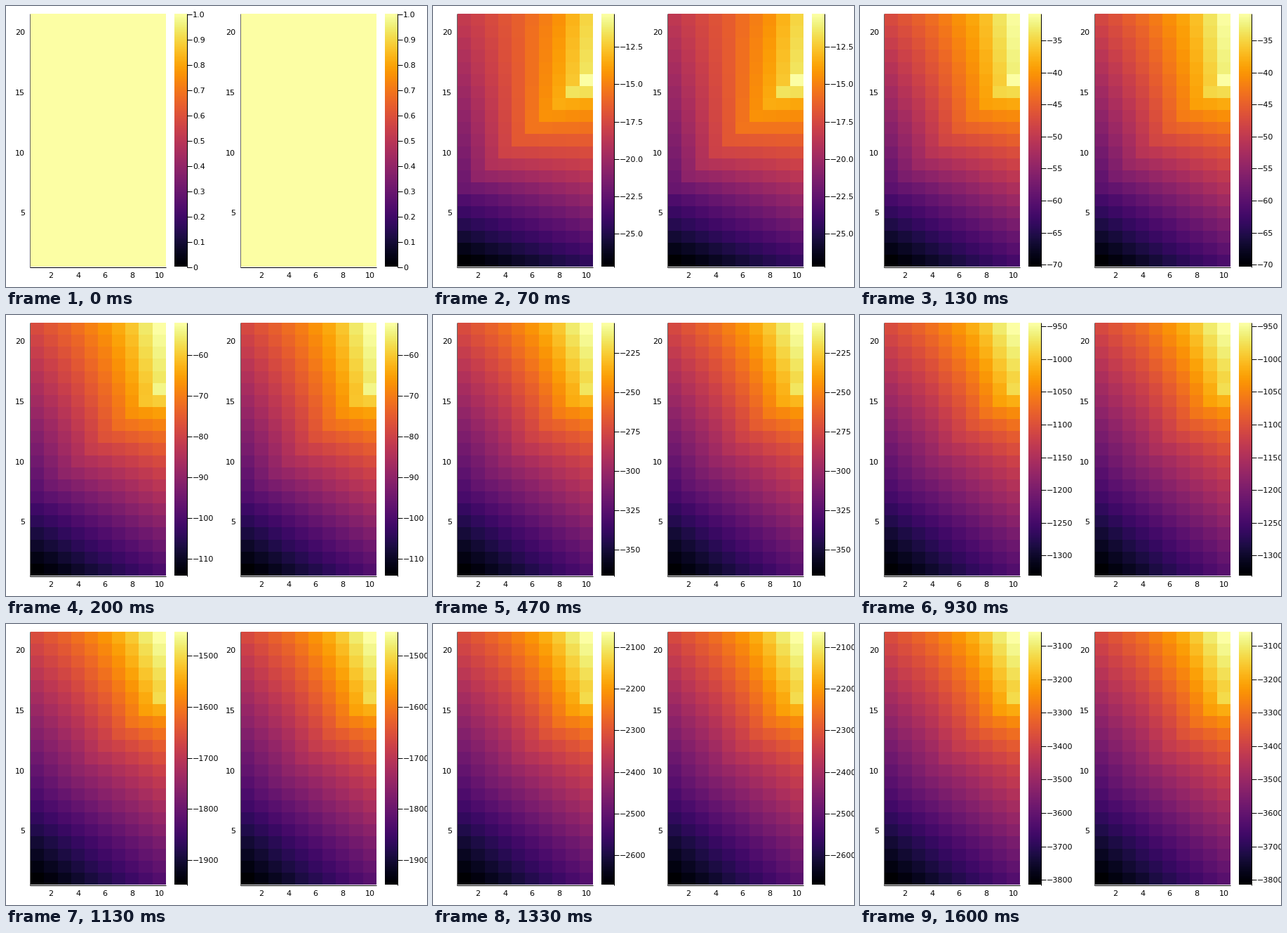
A matplotlib script for the animation above (1.67 s loop, 600 by 400 pixels).

```python
import numpy as np
import matplotlib.pyplot as plt
from matplotlib.animation import FuncAnimation

W, H = 600, 400
LOOP_MS, TICK_MS = 1670, 10
STEPS_PER_SECOND = 15
TOP, BOTTOM = 11.5, 371.5
COLS, ROWS = 10, 21
GOAL_X, GOAL_Y = 10, 16
PX = 0.72  # one pixel in points at 100 dpi

plt.rcParams["font.family"] = "DejaVu Sans"
fig = plt.figure(figsize=(W / 100, H / 100), dpi=100, facecolor="white")
ax = fig.add_axes([0, 0, 1, 1])
ax.axis("off")

# Value range over time: smooth curves through a few known steps.
STEPS = [1, 3, 10, 14, 20, 24]
high = np.poly1d(np.polyfit(STEPS, [-10.31, -52.2, -442.3, -945.2, -2064.5, -3059], 5))
low = np.poly1d(np.polyfit(STEPS, [-27.21, -114.2, -692.1, -1331.2, -2671, -3815], 5))

x, y = np.meshgrid(np.arange(1, COLS + 1), np.arange(1, ROWS + 1))
dx, dy = GOAL_X - x, GOAL_Y - y
far, near = np.maximum(dx, dy), np.minimum(dx, dy)
goal = (far == 0) & (near == 0)


def early_field():
    base = np.interp(far, [0, 1, 2, 5, 9, 15], [.935, .87, .80, .63, .44, .16])
    slope = np.clip(.0035 * (far - 4.5), -.008, .018)
    v = base - slope * near
    v[goal] += .065
    v[(far == 1) & (dy == 1)] += .05
    return v


def late_field():
    base = np.interp(far, [0, 1, 2, 3, 4, 6, 9, 12, 15],
                     [.855, .80, .73, .67, .62, .535, .44, .335, .247])
    v = base - np.where(near > 0, .0275, .029) * near
    v[goal] += .04
    return v


EARLY, LATE = early_field(), late_field()


def field(n, panel):
    """Normalised values of one panel at step n."""
    if n == 0:
        return np.ones((ROWS, COLS))
    w = n ** -0.9
    v = w * EARLY + (1 - w) * LATE - .002 * panel * dx
    return (v - v.min()) / (v.max() - v.min())


def tick_step(span):
    mag = 10 ** np.floor(np.log10(span / 8))
    return next(m * mag for m in (1, 2, 2.5, 5, 10) if span / (m * mag) <= 8)


def ticks(n):
    """Pairs of position (0 to 1) and label for the colour bar."""
    if n == 0:
        return [(k / 10, f"{k / 10:.1f}" if k else "0") for k in range(11)]
    lo, hi = low(n), high(n)
    step = tick_step(hi - lo)
    digits = 0 if step == int(step) else 1
    values = np.arange(np.ceil(lo / step), np.floor(hi / step) + 1) * step
    return [((v - lo) / (hi - lo), f"\u2212{-v:.{digits}f}") for v in values]


def label(px, py, text, align):
    return ax.text(px, py + 4, text, fontsize=8, ha=align, va="baseline", color="black")


def line(xs, ys, color="black"):
    return ax.plot(xs, ys, color=color, lw=PX, solid_capstyle="butt", zorder=4)[0]


def image(data, left, right, smooth=False):
    return ax.imshow(data, cmap="inferno", vmin=0, vmax=1, aspect="auto",
                     extent=(left, right, np.floor(BOTTOM), np.floor(TOP)), zorder=2,
                     interpolation="bilinear" if smooth else "nearest")


def build_panel(off):
    heat = image(np.ones((ROWS, COLS)), off + 35, off + 228)
    image(np.linspace(1, 0, 256)[:, None], off + 240, off + 258, smooth=True)
    # Whole coordinates snap to single pixel lines.
    line([off + 34] * 2, [11, 372], "#666666")
    line([off + 34, off + 228], [372] * 2)
    line([off + 258] * 2, [11, 372])
    for c in range(2, COLS + 1, 2):
        label(off + 35 + (c - .5) * 19.3, 383, str(c), "center")
    for r in range(5, ROWS, 5):
        py = BOTTOM - (r - .5) * (BOTTOM - TOP) / ROWS
        label(off + 27, py, str(r), "right")
    return heat


OFFSETS = (0, 300)
heats = [build_panel(off) for off in OFFSETS]
ax.set_xlim(0, W)
ax.set_ylim(H, 0)
ax.set_autoscale_on(False)
marks = []


def show_step(n):
    while marks:
        marks.pop().remove()
    for panel, off in enumerate(OFFSETS):
        heats[panel].set_data(field(n, panel)[::-1])
        for pos, text in ticks(n):
            py = BOTTOM - pos * (BOTTOM - TOP)
            marks.append(line([off + 258, off + 264.5], [py, py]))
            marks.append(label(off + 266, py, text, "left"))


def draw(tick):
    # Steps start at multiples of 1/15 s, rounded to the nearest tick.
    show_step(int((tick + .5) * TICK_MS * STEPS_PER_SECOND / 1000))
    return heats + marks


anim = FuncAnimation(fig, draw, frames=LOOP_MS // TICK_MS, init_func=lambda: draw(0),
                     interval=TICK_MS, repeat=True, blit=False)
plt.show()
```
